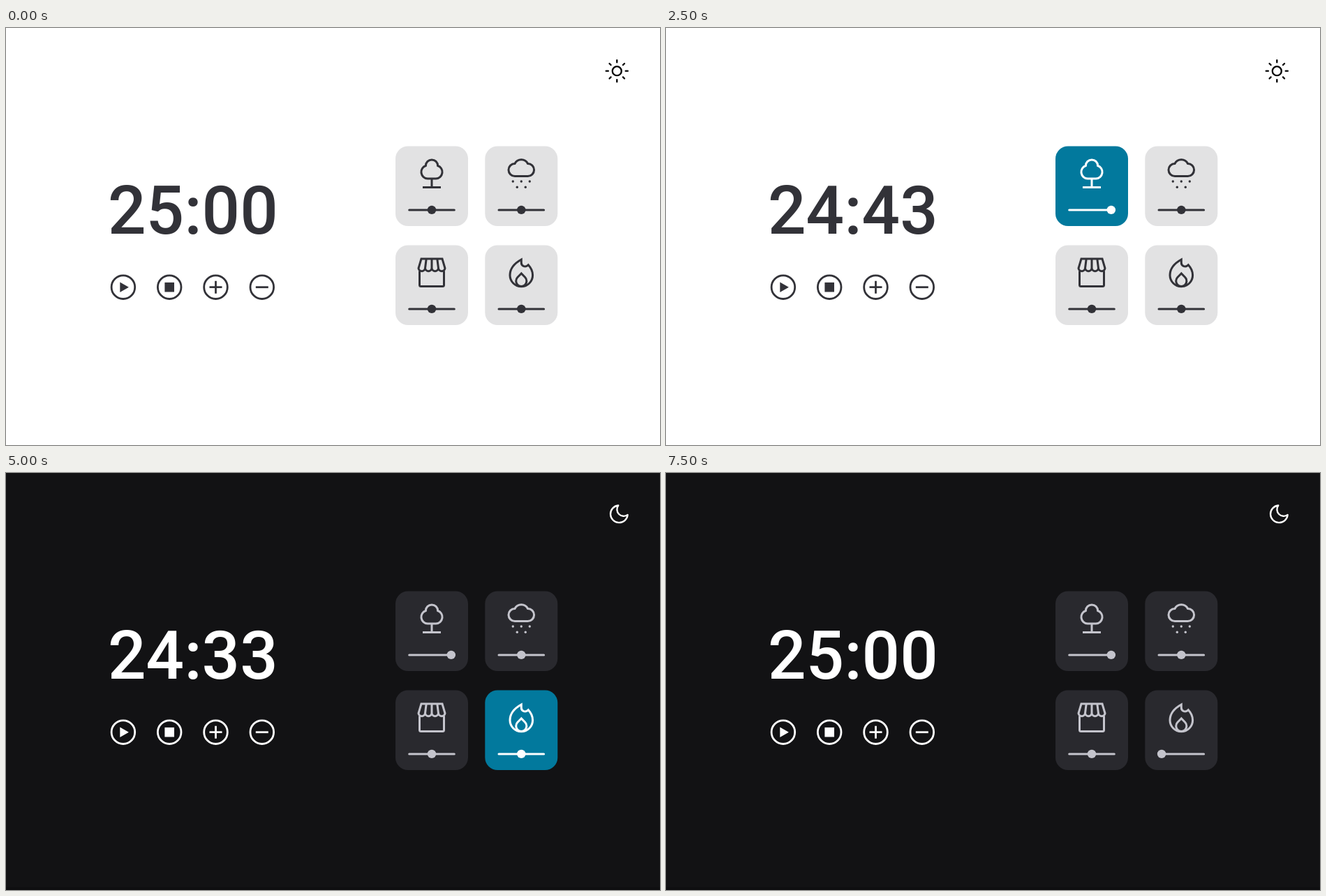
Recreate the animation shown at these times as an HTML page. Size 937 px wide and 598 px high, loop 8.75 s.

```html
<!DOCTYPE html>
<html lang="en">
<head>
<meta charset="utf-8">
<title>Focus timer</title>
<style>
  html, body { margin: 0; height: 100%; overflow: hidden; }
  svg { display: block; --bg: #fff; --edge: #fff; --ink: #323238; --card: #e2e2e3; --icon: #323238; background: var(--bg); }
  svg.dark { --bg: #121214; --edge: #0e0e10; --ink: #fff; --card: #29292e; --icon: #c4c4cc; }
  .card { --face: var(--card); --line: var(--icon); fill: none; stroke: var(--line); stroke-width: 3; }
  .card.on { --face: #02799d; --line: #fff; }
  .face { fill: var(--face); stroke: none; }
  .solid { fill: var(--line); stroke: none; }
  .track { stroke-linecap: round; }
  .button { fill: none; stroke: var(--ink); stroke-width: 2.8; }
  .button .solid { fill: var(--ink); }
  #clock { font: 500 96px Roboto, sans-serif; fill: var(--ink); }
  #sun, #moon { fill: none; stroke: #000; stroke-width: 2.3; stroke-linecap: round; }
  #moon { stroke: #fff; stroke-width: 1.7; stroke-linejoin: round; }
  .dark #sun, svg:not(.dark) #moon { display: none; }
</style>
</head>
<body>
<svg id="stage" width="937" height="598" viewBox="0 0 937 598">
  <rect y="594" width="937" height="4" fill="var(--edge)"/>
  <g id="sun" transform="translate(875.3 61.7)"><circle r="6.5"/></g>
  <path id="moon" transform="translate(861.9 42.4) scale(1.37)" d="M21 12.79A9 9 0 1 1 11.21 3 7 7 0 0 0 21 12.79z"/>
  <text id="clock" x="146" y="295"></text>
</svg>
<script>
const STEP = 1250;
// Each state: time left, dark theme, active card, tree volume, fire volume
const states = [
  ['25:00', false, -1, 0, 0],
  ['24:51', false, 0, 0, 0],
  ['24:43', false, 0, 1, 0],
  ['24:38', true, 0, 1, 0],
  ['24:33', true, 3, 1, 0],
  ['24:27', true, 3, 1, -1],
  ['25:00', true, -1, 1, -1],
];

const dot = (x, y) => `<circle class="solid" cx="${x}" cy="${y}" r="1.7"/>`;
const path = d => `<path d="${d}"/>`;
const icons = {
  tree: path('M-8.6 28A8.6 8.6 0 0 1 8.6 28A9.5 9.5 0 0 1 6 46.5H-6A9.5 9.5 0 0 1-8.6 28ZM0 47V59M-13 59H13'),
  rain: path('M-9.3 43A9 9 0 0 1-9.3 25A10.4 10.4 0 0 1 9.3 25A9 9 0 0 1 9.3 43Z') +
    [-12, 0, 12].map(x => dot(x, 50.5)).join('') + dot(-6, 58.7) + dot(6, 58.7),
  shop: path('M-15 19.5H15L19 33a4.8 4.9 0 0 1-9.5 0a4.8 4.9 0 0 1-9.5 0a4.8 4.9 0 0 1-9.5 0a4.8 4.9 0 0 1-9.5 0Z' +
    'M-9.5 33L-7.8 19.5M0 33V19.5M9.5 33L7.8 19.5M-17.5 37V57a2 2 0 0 0 2 2H15.5a2 2 0 0 0 2-2V37'),
  fire: path('M0 20.5C-9 25.5-16.3 33.5-16.3 43A16.3 16.3 0 0 0 16.3 43C16.3 37 13.5 32 10 28.3C6 32.5 0 30 0 25Z' +
    'M0 40.5L-5.4 46A7.6 7.6 0 1 0 5.4 46Z'),
};
const buttons = [
  '<path class="solid" d="M-4.6-7.3L8 0L-4.6 7.3Z"/>',
  '<rect class="solid" x="-6.8" y="-6.8" width="13.6" height="13.6"/>',
  path('M-9 0H9M0-9V9'),
  path('M-9 0H9'),
];

const stage = document.getElementById('stage');
const clock = document.getElementById('clock');
const add = (parent, html) => parent.insertAdjacentHTML('beforeend', html);

for (let i = 0; i < 8; i++) {
  const [from, to] = i % 2 ? [12.3, 15.2] : [12.4, 15.6];
  add(document.getElementById('sun'), `<path transform="rotate(${i * 45})" d="M${from} 0H${to}"/>`);
}
buttons.forEach((symbol, i) => add(stage,
  `<g class="button" transform="translate(${167.9 + i * 66.3} 371.7)"><circle r="16.8"/>${symbol}</g>`));
Object.values(icons).forEach((icon, i) => add(stage,
  `<g class="card" transform="translate(${610 + i % 2 * 128.3} ${169.5 + (i >> 1) * 142})">
    <rect class="face" x="-52" width="104" height="114.5" rx="18"/>${icon}
    <path class="track" d="M-32.3 91.4H32.3"/><circle class="solid knob" cy="91.4" r="6.2"/></g>`));

const cards = [...stage.querySelectorAll('.card')];
const knobs = stage.querySelectorAll('.knob');

function draw(now) {
  const [time, dark, active, tree, fire] = states[Math.floor(now / STEP) % states.length];
  clock.textContent = time;
  stage.classList.toggle('dark', dark);
  cards.forEach((card, i) => card.classList.toggle('on', i === active));
  knobs[0].setAttribute('cx', tree * 27.8);
  knobs[3].setAttribute('cx', fire * 28.2);
}

const start = performance.now();
function tick() {
  draw(performance.now() - start);
  requestAnimationFrame(tick);
}
tick();
</script>
</body>
</html>
```
